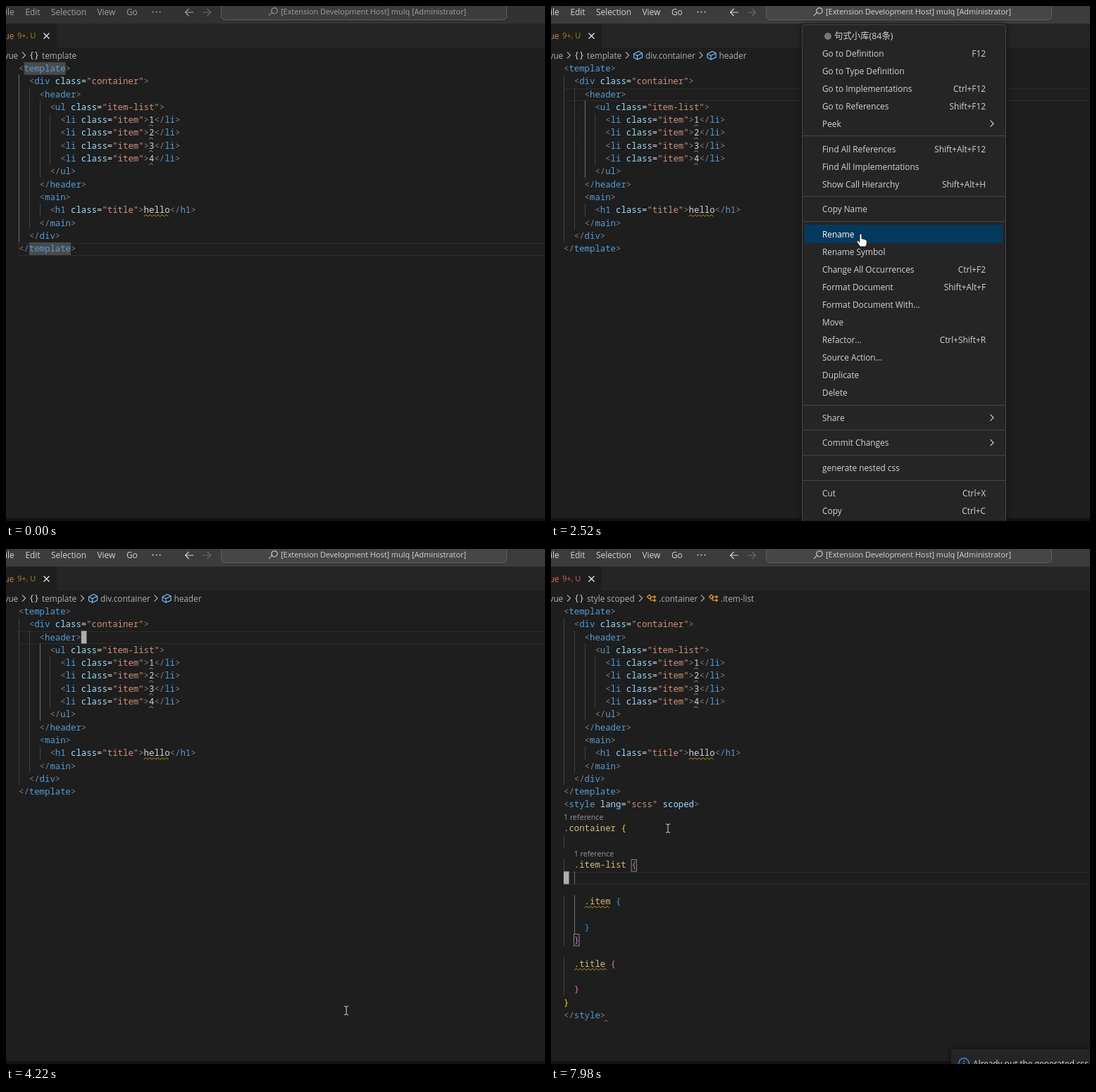
These frames come from a looping animation (765x732 px, 8000 ms). An HTML page:

```html
<!DOCTYPE html>
<html lang="en">
<head>
<meta charset="utf-8">
<title>Nested CSS generator</title>
<style>
  html, body { margin: 0; width: 100%; height: 100%; overflow: hidden; background: #1e1e1e; }
  svg { display: block; width: 765px; height: 732px; }
  text { white-space: pre; font: 11.85px "Open Sans", "Noto Sans", "Noto Sans CJK SC", sans-serif; }
  .code { font: 500 12.33px "Noto Sans Mono", "DejaVu Sans Mono", monospace; }
</style>
</head>
<body>
<svg id="stage" viewBox="0 0 765 732" xmlns="http://www.w3.org/2000/svg"></svg>
<script>
const LOOP = 8000, LEFT = 18, CHAR = 7.4, LINE = 18.3, TOP = 88.8, LENS = 15.4;
const UI_TEXT = '#d4d4d4', UI_SIZE = 11.85;
const stage = document.getElementById('stage');

function el(parent, tag, attrs = {}, content) {
  const node = document.createElementNS('http://www.w3.org/2000/svg', tag);
  for (const key in attrs) node.setAttribute(key, attrs[key]);
  if (content !== undefined) node.textContent = content;
  parent.append(node);
  return node;
}
const group = (parent = stage) => el(parent, 'g');
const rect = (parent, x, y, width, height, fill, more) =>
  el(parent, 'rect', { x, y, width, height, fill, ...more });
const line = (parent, d, stroke, more) =>
  el(parent, 'path', { d, stroke, fill: 'none', 'stroke-width': 1, ...more });
// Labels are placed by their vertical centre.
const label = (parent, x, y, content, fill = UI_TEXT, size = UI_SIZE, more) =>
  el(parent, 'text', { x, y: y + size * 0.36, fill, style: `font-size:${size}px`, ...more }, content);
const show = (node, on) => node.setAttribute('visibility', on ? 'inherit' : 'hidden');
const chevron = (parent, x, y, color = '#a9a9a9') =>
  line(parent, `M${x} ${y - 4.5}l4.5 4.5-4.5 4.5`, color, { 'stroke-width': 1.2 });
const rowY = i => TOP + i * LINE;
const colX = c => LEFT + c * CHAR;

function squiggle(parent, col, length, y, color) {
  let d = `M${colX(col)} ${y + 9}`;
  for (let i = 0; i < Math.round(length * CHAR / 5.8); i++) d += 'l2.9-2.3 2.9 2.3';
  line(parent, d, color);
}

// ---- Code ----
const BRACES = ['#ffd700', '#da70d6', '#179fff'];
const TOKEN = /(<\/?)(\w+)|("[^"]*")|(>)|([a-z]+)(?=[=>])|(\.[\w-]+)|([{}])|(\S)/g;

function codeText(parent, col, y, content, fill) {
  el(parent, 'text', { class: 'code', x: colX(col), y: y + 4.1, fill }, content);
}

function codeLine(parent, source, y) {
  const indent = source.match(/^ */)[0].length;
  for (let c = 0; c < indent; c += 2)
    rect(parent, Math.round(colX(c)), y - 9.15, 1, LINE, '#404040');
  for (const m of source.matchAll(TOKEN)) {
    if (m[1]) {
      codeText(parent, m.index, y, m[1], '#808080');
      codeText(parent, m.index + m[1].length, y, m[2], '#569cd6');
    } else {
      const color = m[3] ? '#ce9178' : m[4] ? '#808080' : m[5] ? '#9cdcfe'
        : m[6] ? '#d7ba7d' : m[7] ? BRACES[indent / 2] : '#d4d4d4';
      codeText(parent, m.index, y, m[0], color);
    }
  }
}

const item = n => `        <li class="item">${n}</li>`;
const MARKUP = ['<template>', '  <div class="container">', '    <header>', '      <ul class="item-list">',
  item(1), item(2), item(3), item(4), '      </ul>', '    </header>', '    <main>',
  '      <h1 class="title">hello</h1>', '    </main>', '  </div>', '</template>'];
const SHEET = ['<style lang="scss" scoped>', '.container {', '  ', '  .item-list {', '    ', '    .item {',
  '    ', '    }', '  }', '  .title {', '  ', '  }', '}', '</style>'];
const WARNING = '#b8921c';

function buildSheet(lens) {
  const g = group();
  let y = rowY(14);
  SHEET.forEach(source => {
    y += LINE + (/\.\S+ \{/.test(source) ? lens : 0);
    codeLine(g, source, y);
    const warned = source.match(/\.(item|title) /);
    if (warned) squiggle(g, warned.index, warned[0].length - 1, y, WARNING);
  });
  squiggle(g, 7.7, 1, y, '#f14c4c');
  return g;
}

rect(stage, 0, 0, 765, 732, '#1e1e1e');
const currentLine = rect(stage, LEFT, 0, 760, 17, 'none', { stroke: '#2c2c2c' });

const tagMarks = group();
rect(tagMarks, colX(1), rowY(0) - 9, 8 * CHAR, 18, '#4a4a4a');
rect(tagMarks, colX(2), rowY(14) - 9, 8 * CHAR, 18, '#4a4a4a');

MARKUP.forEach((source, i) => {
  codeLine(stage, source, rowY(i));
  const word = source.match(/>(\w+)</);
  if (word) squiggle(stage, word.index + 1, word[1].length, rowY(i), WARNING);
});
const tightSheet = buildSheet(0), lensSheet = buildSheet(LENS);

const activeGuide = (x, y1, y2) => rect(stage, x, y1, 1, y2 - y1, '#707070');
const rootGuide = activeGuide(18, rowY(1) - 9, rowY(13) + 9);
const headerGuide = activeGuide(Math.round(colX(4)), rowY(3) - 9, rowY(8) + 9);

const listMarks = group();
rect(listMarks, 33, 458.5, 1, 17.5, '#707070');
rect(listMarks, 33, 492, 1, 55, '#707070');
rect(listMarks, 114, 441.5, 7.5, 16.5, 'none', { stroke: '#888' });
rect(listMarks, 32.5, 547.5, 7.5, 16.5, 'none', { stroke: '#888' });

const lensLabels = group();
label(lensLabels, 18, 381, '1 reference', '#999999', 10.7);
label(lensLabels, 32.7, 433.5, '1 reference', '#999999', 10.7);

const bulb = group();
el(bulb, 'path', { fill: '#75beff', d: 'M25 636.5a5 5 0 0 1 3 9v3.5h-5.5v-3.5a5 5 0 0 1 2.5-9z' });
el(bulb, 'circle', { cx: 29.2, cy: 647.3, r: 2.2, fill: '#1e1e1e', stroke: '#75beff', 'stroke-width': 1.5 });

const caret = rect(stage, 0, 0, 7.6, 18, '#aeafad');

// ---- Title bar, tab, breadcrumbs ----
const titleBar = rect(stage, 0, 0, 765, 25, '#3c3c3c');
const titleText = group();
[[-7, 'File'], [27.5, 'Edit'], [64, 'Selection'], [129.5, 'View'], [171, 'Go']]
  .forEach(([x, name]) => label(titleText, x, 9, name, 'currentColor'));
[208.5, 213.5, 218.5].forEach(cx => el(titleText, 'circle', { cx, cy: 8.5, r: 1, fill: 'currentColor' }));
line(titleText, 'M266 9H254.5M259.5 4l-5 5 5 5', 'currentColor', { 'stroke-width': 1.2 });
line(titleText, 'M279 9h11.5M285.5 4l5 5-5 5', '#6a6a6a', { 'stroke-width': 1.2 });
rect(titleText, 305.5, -10, 405, 29.5, '#ffffff', { 'fill-opacity': 0.05, stroke: '#5f5f5f', rx: 5 });
line(titleText, 'M373 14l5-5.5M377.4 9a4.2 4.2 0 1 1 2 1.7l-2-1.7', 'currentColor', { 'stroke-width': 1.1 });
label(titleText, 390, 8.5, '[Extension Development Host] mulq [Administrator]', 'currentColor', 10.88);

rect(stage, 0, 25, 765, 34, '#252526');
rect(stage, 0, 25, 72, 34, '#1e1e1e');
const tabName = label(stage, -8.5, 42.5, 'vue');
const tabBadge = label(stage, 16, 42.5, '9+, U', '', 11);
line(stage, 'M53.5 38.5l8 8m0-8l-8 8', '#e8e8e8', { 'stroke-width': 1.3 });

const CRUMB = '#b0b0b0';
label(stage, -2.5, 70.5, 'vue', CRUMB, 11.75);
chevron(stage, 23, 70);

function icon(parent, kind, x) {
  const cube = kind === 'cube';
  const d = cube ? 'M-6-2L1-5.5 6-3V3L-1 6-6 3.5ZM-6-2L-1 .5 6-3M-1 .5V6'
    : 'M-6-2l3-3 3 3-3 3zM-.5-2H3M-1-2V3H3M3-2l1.5-1.5L6-2 4.5-.5zM3 3l1.5-1.5L6 3 4.5 4.5z';
  line(parent, d, cube ? '#75beff' : '#ee9d28', { transform: `translate(${x + 6.5} 70)`, 'stroke-width': 1.2 });
}
function crumbs(scope, kind, ...parts) {
  const g = group();
  label(g, 34, 69.5, '{}', UI_TEXT, 13, { 'letter-spacing': 2 });
  label(g, 51, 70.5, scope, CRUMB, 11.75);
  parts.forEach(([x, name]) => {
    chevron(g, x - 28, 70);
    icon(g, kind, x - 17);
    label(g, x, 70.5, name, CRUMB, 11.75);
  });
  return g;
}
const dots = group();
label(dots, 33, 70.5, '...', CRUMB, 11.75);
const trails = {
  dots,
  root: crumbs('template'),
  header: crumbs('template', 'cube', [134, 'div.container'], [238.5, 'header']),
  sheet: crumbs('style scoped'),
  list: crumbs('style scoped', 'class', [153, '.container'], [241, '.item-list'])
};

rect(stage, 0, 728, 765, 4, '#190f14');

// ---- Notification ----
const SHADOW = { style: 'filter:drop-shadow(0 0 4px rgba(0,0,0,.55))' };
const toast = group();
rect(toast, 568, 711, 230, 60, '#252526', { rx: 3, ...SHADOW });
el(toast, 'circle', { cx: 586, cy: 731, r: 7.3, fill: 'none', stroke: '#3794ff', 'stroke-width': 1.3 });
rect(toast, 585.3, 727, 1.5, 1.6, '#3794ff');
rect(toast, 585.3, 730, 1.5, 5, '#3794ff');
label(toast, 599, 732, 'Already put the generated css file');

// ---- Context menu: name|shortcut, ">" marks a submenu, "-" a separator ----
const MENU = `句式小库(84条)
Go to Definition|F12
Go to Type Definition
Go to Implementations|Ctrl+F12
Go to References|Shift+F12
Peek|>
-
Find All References|Shift+Alt+F12
Find All Implementations
Show Call Hierarchy|Shift+Alt+H
-
Copy Name
-
Rename
Rename Symbol
Change All Occurrences|Ctrl+F2
Format Document|Shift+Alt+F
Format Document With...
Move
Refactor...|Ctrl+Shift+R
Source Action...
Duplicate
Delete
-
Share|>
-
Commit Changes|>
-
generate nested css
-
Cut|Ctrl+X
Copy|Ctrl+C`.split('\n');

const menu = group();
rect(menu, 356.5, 26.5, 289, 730, '#252526', { stroke: '#454545', rx: 4, ...SHADOW });
const hover = rect(menu, 360, 0, 281, 26, '#04395e', { rx: 2 });
const menuRows = [];
let menuY = 42.4;
MENU.forEach((entry, i) => {
  if (entry === '-') {
    menuY += 10.55;
    rect(menu, 357, Math.round(menuY - 18.8), 288, 1, '#454545');
    return;
  }
  const [name, key] = entry.split('|');
  const g = group(menu);
  if (i === 0) {
    el(g, 'circle', { cx: 393, cy: 43, r: 5, fill: '#777777' });
    label(g, 402, menuY + 0.5, name, 'currentColor', 12.4);
  } else label(g, 385, menuY, name, 'currentColor');
  if (key === '>') chevron(g, 623.5, menuY - 0.5, 'currentColor');
  else if (key) label(g, 617, menuY, key, 'currentColor', UI_SIZE, { 'text-anchor': 'end' });
  menuRows.push({ y: menuY, g });
  menuY += 25.05;
});

// ---- Mouse pointer ----
const mouse = group();
const solid = { fill: '#ffffff', stroke: '#111111', 'stroke-width': 0.8 };
const pointers = {
  beam: line(mouse, 'M-3-6h2l1 1 1-1h2M0-5V5M-3 6h2l1-1 1 1h2', '#d8d8d8'),
  arrow: el(mouse, 'path', { ...solid, d: 'M0 0V12L2.8 9.4 4.7 13.5 6.6 12.6 4.8 8.7H8.5Z' }),
  hand: el(mouse, 'path', { ...solid, d: 'M-2 .5C-2-1.5 1-1.5 1 .5V6l1-.3c1 0 1.5.3 1.7 1 1-.4 2-.1 2.3.8 1.3-.3 2.2.2 2.2 1.5V12c0 2-1 3-1.5 5H-1.5c-.5-1.5-2-3-4-6.5-1-2 .8-2.8 2-1.4L-2 10.5Z' })
};

// ---- Timeline ----
const smooth = u => u * u * (3 - 2 * u), easeIn = u => u * u, easeOut = u => u * (2 - u);
const PATH = [
  [30, 300, 740], [845, 318, 380, easeIn], [1280, 356, 121, easeOut],
  [2160, 356, 121], [2520, 440, 325],
  [2830, 440, 325], [3270, 473, 605], [3620, 483, 656, easeOut],
  [4220, 483, 656], [5020, 101, 377],
  [6810, 101, 377], [7020, 116, 396, easeIn], [7280, 193, 465, easeOut],
  [7660, 193, 465], [7980, 166, 397]
];
const MENU_OPEN = 1710, MENU_CLOSE = 3860, CLICK = 5220, PASTE = 6150, LENS_IN = 6500, PICK = 7640;

function mouseAt(t) {
  const next = PATH.findIndex(p => p[0] > t);
  if (next === 0) return PATH[0].slice(1);
  if (next < 0) return PATH[PATH.length - 1].slice(1);
  const a = PATH[next - 1], b = PATH[next];
  const u = (b[3] || smooth)((t - a[0]) / (b[0] - a[0]));
  return [a[1] + (b[1] - a[1]) * u, a[2] + (b[2] - a[2]) * u];
}

const sheetEnd = t => rowY(28) + (t < LENS_IN ? 0 : 4 * LENS);
const last = (steps, t) => steps.filter(s => s[0] <= t).pop();

function render(t) {
  const focused = t >= 30, open = t >= MENU_OPEN && t < MENU_CLOSE;
  const broken = t >= 6400;

  titleBar.setAttribute('fill', focused ? '#3c3c3c' : '#323233');
  titleText.setAttribute('color', focused ? UI_TEXT : '#a0a0a0');
  tabName.setAttribute('fill', broken ? '#f0624d' : '#d7803a');
  tabBadge.setAttribute('fill', broken ? '#d0604e' : '#a8861a');

  const trail = last([[0, 'root'], [1270, 'dots'], [1750, 'header'], [CLICK, 'dots'],
    [7240, 'sheet'], [7900, 'list']], t)[1];
  for (const name in trails) show(trails[name], name === trail);

  // Caret steps restart the blink.
  const [since, column, y] = last([[0, 11, rowY(14)], [1270, 12, rowY(2)], [MENU_CLOSE, 12, rowY(2)],
    [CLICK, 0, rowY(15)], [PASTE, 8, sheetEnd(t)], [6300, 8, sheetEnd(t)], [PICK, 0, 467.3]], t);
  currentLine.setAttribute('y', Math.round(y - 8.5) + 0.5);
  caret.setAttribute('x', colX(column));
  caret.setAttribute('y', y - 9);
  show(caret, focused && !open && (t - since) % 1000 < 500);

  show(tagMarks, t < 1270);
  show(rootGuide, t < 1270);
  show(headerGuide, t >= 1270 && t < CLICK);
  show(tightSheet, t >= PASTE && t < LENS_IN);
  show(lensSheet, t >= LENS_IN);
  show(bulb, t >= 6810 && t < PICK);
  show(listMarks, t >= PICK);
  show(lensLabels, t >= 7700);

  const shown = Math.min(1, Math.max(0, (t - 4350) / 250));
  show(toast, shown > 0);
  toast.setAttribute('opacity', shown);

  const [x, my] = mouseAt(t);
  const hovered = open && x > 360 && x < 641 ? menuRows.find(r => Math.abs(r.y - my) < 12.5) : undefined;
  show(menu, open);
  menu.setAttribute('opacity', Math.min(1, 0.3 + Math.max(0, t - MENU_OPEN) / 110));
  menuRows.forEach(r => r.g.setAttribute('color', r === hovered ? '#ffffff' : UI_TEXT));
  show(hover, hovered);
  if (hovered) hover.setAttribute('y', Math.floor(hovered.y - 13));

  mouse.setAttribute('transform', `translate(${x} ${my})`);
  show(mouse, focused);
  const pointer = !open ? 'beam' : hovered ? 'hand' : 'arrow';
  for (const name in pointers) show(pointers[name], name === pointer);
}

const start = performance.now();
function frame() {
  render((performance.now() - start) % LOOP);
  requestAnimationFrame(frame);
}
frame();
</script>
</body>
</html>
```
